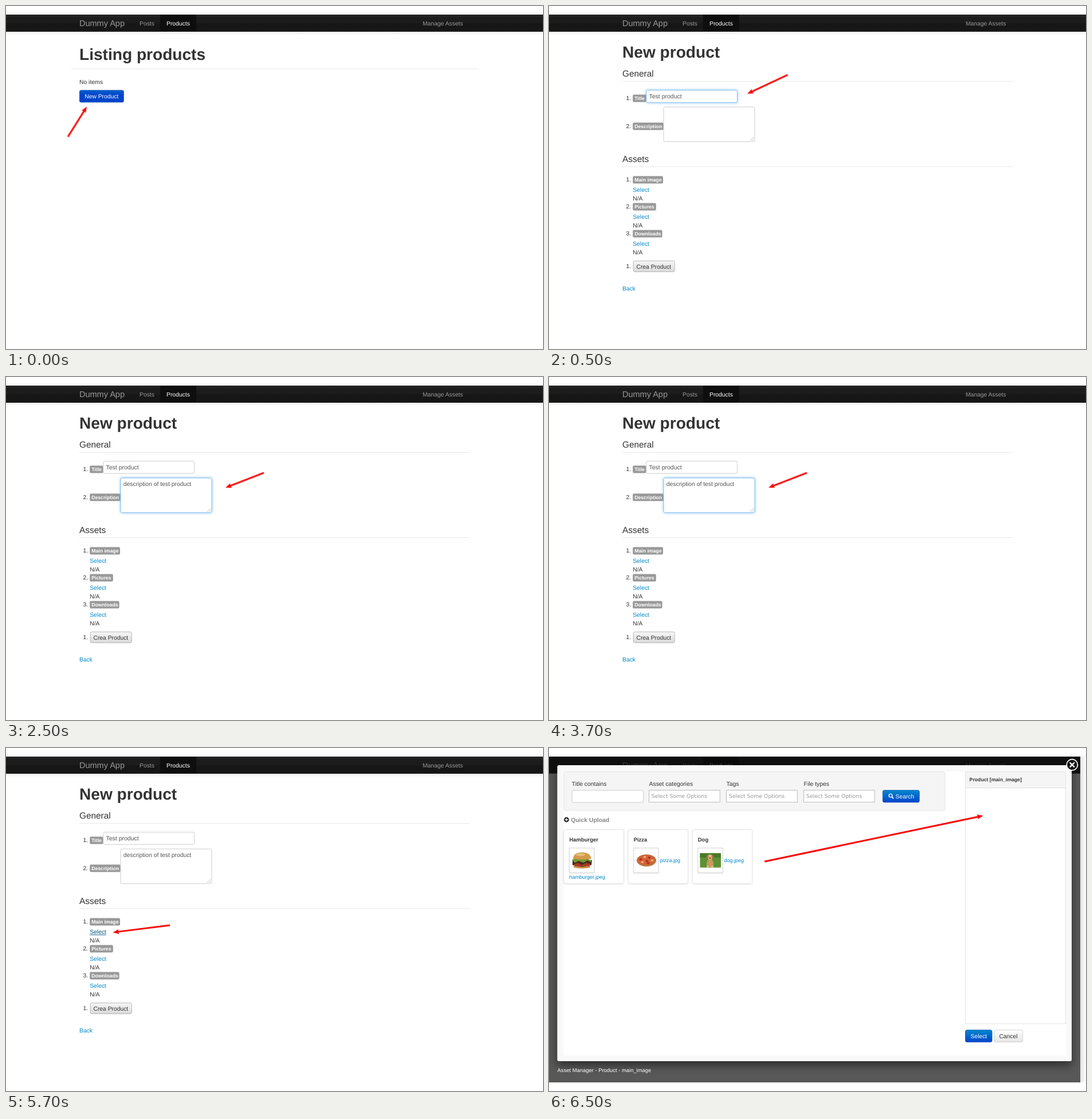
Animation, 937 px wide and 598 px high, one loop 8000 ms. Source, as an HTML page:

```html
<!DOCTYPE html>
<html lang="en">
<head>
<meta charset="utf-8">
<title>Product assets</title>
<style>
html, body { margin: 0; width: 100%; height: 100%; overflow: hidden; background: #fff; }
svg { display: block; }
text { font-family: "Liberation Sans", Arial, sans-serif; text-rendering: geometricPrecision; white-space: pre; }
.dv { font-family: "DejaVu Sans", sans-serif; }
</style>
</head>
<body>
<svg id="stage" width="937" height="598" viewBox="0 0 937 598" xmlns="http://www.w3.org/2000/svg">
  <defs>
    <linearGradient id="nav" x2="0" y2="1"><stop stop-color="#222"/><stop offset="1" stop-color="#111"/></linearGradient>
    <linearGradient id="blue" x2="0" y2="1"><stop stop-color="#08c"/><stop offset="1" stop-color="#04c"/></linearGradient>
    <linearGradient id="deep" x2="0" y2="1"><stop stop-color="#0060cc"/><stop offset=".4" stop-color="#04c"/><stop offset="1" stop-color="#04c"/></linearGradient>
    <linearGradient id="pale" x2="0" y2="1"><stop stop-color="#fff"/><stop offset="1" stop-color="#e6e6e6"/></linearGradient>
    <linearGradient id="grey" x2="0" y2="1"><stop stop-color="#f6f6f6"/><stop offset="1" stop-color="#dadada"/></linearGradient>
    <linearGradient id="edge"><stop stop-color="#e4e4e4"/><stop offset="1" stop-color="#fdfdfd"/></linearGradient>
    <filter id="glow" x="-20%" y="-50%" width="140%" height="200%"><feDropShadow dx="0" dy="0" stdDeviation="2.6" flood-color="#52a8ec" flood-opacity=".65"/></filter>
    <filter id="drop" x="-10%" y="-10%" width="120%" height="125%"><feDropShadow dx="0" dy="7" stdDeviation="8" flood-opacity=".5"/></filter>
    <filter id="soft" x="-10%" y="-50%" width="120%" height="220%"><feDropShadow dx="0" dy="1" stdDeviation="3" flood-opacity=".12"/></filter>
    <filter id="faint" x="-10%" y="-10%" width="120%" height="125%"><feDropShadow dx="0" dy=".8" stdDeviation=".9" flood-opacity=".12"/></filter>
    <clipPath id="lawn"><rect x="263.5" y="183.5" width="36.5" height="25"/></clipPath>
  </defs>
</svg>
<script>
const LOOP = 8000, BODY = 10.35, LINK = '#08c';
const stage = document.getElementById('stage');

// y is the middle of the capitals
const text = (s, x, y, size = BODY, fill = '#333', more = '') =>
  `<text x="${x}" y="${y + size * .36}" font-size="${size}" fill="${fill}" ${more}>${s}</text>`;
const bold = (s, x, y, size, fill) => text(s, x, y, size, fill, 'font-weight="700"');
const box = (x, y, w, h, fill, stroke = 'none', r = 0, more = '') =>
  `<rect x="${x}" y="${y}" width="${w}" height="${h}" rx="${r}" fill="${fill}" stroke="${stroke}" ${more}/>`;
const path = (d, fill, more = '') => `<path d="${d}" fill="${fill}" ${more}/>`;
const oval = (x, y, rx, ry, fill, more = '') =>
  `<ellipse cx="${x}" cy="${y}" rx="${rx}" ry="${ry}" fill="${fill}" ${more}/>`;
const rule = (x, y, w) => box(x, y, w, 1, '#e8e8e8');
const field = (x, y, w, h, focus) => focus
  ? box(x, y, w, h, '#fff', '#7fbdee', 2.5, 'filter="url(#glow)"')
  : box(x, y, w, h, '#fff', '#ccc', 2.5);
const tag = (s, x, y, w) => box(x, y - 6.3, w, 13, '#999', 'none', 2.2) + bold(s, x + 3, y + .2, 8.7, '#fff');

function button(s, x, y, w, h, tx, kind = 'blue') {
  const plain = kind === 'pale' || kind === 'grey';
  const line = kind === 'grey' ? '#aaa' : plain ? '#c8c8c8' : '#0549b8';
  return box(x + .4, y + .4, w - .8, h - .8, `url(#${kind})`, line, 2.6, 'stroke-width=".8"') +
    text(s, tx, y + h / 2 + .1, 10.3, plain ? '#333' : '#fff');
}

function arrow(x1, y1, x2, y2, width = 2.8) {
  const len = Math.hypot(x2 - x1, y2 - y1);
  const turn = Math.atan2(y2 - y1, x2 - x1) * 180 / Math.PI;
  return `<g transform="translate(${x2} ${y2}) rotate(${turn})">` +
    path(`M${-len} 0H-7`, 'none', `stroke="#f80808" stroke-width="${width}"`) +
    path('M0 0L-10.5 -4.3L-9 0L-10.5 4.3Z', '#f80808') + '</g>';
}

const navText = (dim, plain) =>
  text('Dummy App', 128, 30, 14.5, dim) + text('Posts', 233, 30, BODY, dim) +
  text('Products', 280, 30, BODY, plain) + text('Manage Assets', 727, 30, 10.3, dim);

const navbar = () =>
  box(-10, 15, 957, 29.5, 'url(#nav)', 'none', 0, 'filter="url(#soft)"') +
  box(0, 44, 937, .8, '#252525') +
  box(269, 15, 63, 29, '#0e0e0e') + navText('#999', '#fff');

const listing = () =>
  bold('Listing products', 128, 84, 28.1) + rule(114, 109.2, 710) +
  text('No items', 128, 132) +
  button('New Product', 128, 146.5, 77.7, 21.7, 137.3, 'deep') +
  arrow(108, 228, 141, 175.5);

const form = () => {
  let s = bold('New product', 128, 80.3, 28.1) +
    text('General', 128, 117.5, 15.35) + rule(128, 131, 681) +
    text('Assets', 128, 266, 15.4) + rule(128, 279.5, 681) +
    text('1.', 134.6, 160.5) + tag('Title', 146.2, 160.8, 23.5) +
    text('2.', 134.6, 209) + tag('Description', 146.2, 209.6, 53.6);
  [['Main image', 52.8], ['Pictures', 40.6], ['Downloads', 51.4]].forEach(([name, w], i) => {
    const y = 302.6 + 47 * i;
    s += text(i + 1 + '.', 134.6, y - .4) + tag(name, 146.2, y + .2, w) + text('N/A', 146.2, y + 32.2);
    if (i) s += text('Select', 146.2, y + 18, BODY, LINK);
  });
  return s + text('1.', 134.6, 453.2) +
    button('Crea Product', 146.7, 444, 73, 19.8, 152.5, 'grey') +
    text('Back', 128, 492.7, BODY, LINK);
};

const titleField = focus => field(169.8, 146.8, 158.7, 21.4, focus) +
  text('Test product', 174.5, 157.5, 10.5, '#555');
const noteField = (focus, s) => field(200, 176, 159, 60.4, focus) +
  text(s, 204.8, 186.5, BODY, '#555') +
  path('M351 235L357.5 228.5M354.5 235L357.5 232', 'none', 'stroke="#aaa" stroke-width=".7"');
const pick = hover => text('Select', 146.2, 320.6, BODY, hover ? '#005580' : LINK) +
  (hover ? box(146.2, 325.4, 28.5, .9, '#005580') : '');

const burger = () =>
  oval(57.5, 207, 15, 3, '#c98c45') +
  path('M41 196Q57 190 75 196L74 204Q57 210 41 204Z', '#4b2a18') +
  path('M40 195Q46 191 57 193T75 195L73 199L67 196L60 200L52 197L45 200Z', '#6f9a35') +
  path('M43 203L50 200L57 204L65 200L73 203L70 206H45Z', '#a83a22') +
  path('M42 193Q43 182 57.5 182T74 193Q58 196 42 193Z', '#d29a4c') +
  oval(55, 186, 8, 2.5, '#e6bd78');

const pizza = () => oval(170, 196, 17, 10.5, '#b8743a') + oval(169.5, 195, 15, 8.6, '#d4603a') +
  [[160, 194], [167, 190], [175, 191], [180, 196], [171, 197], [163, 199], [173, 201]]
    .map(([x, y], i) => oval(x, y, 2.6, 1.7, i % 2 ? '#e8b26c' : '#a9301f')).join('');

const dog = () => `<g clip-path="url(#lawn)">` + box(263, 183, 38, 26, '#5c9134') +
  box(263, 183, 38, 8, '#47792a') + oval(281, 202, 6, 8, '#c79a5e') +
  oval(281, 190.5, 4.8, 5, '#d9b27a') + oval(276.5, 191, 1.7, 3.7, '#a87840') +
  oval(285.5, 191, 1.7, 3.7, '#a87840') + oval(281, 192, 1.2, .9, '#3b281b') +
  oval(277, 207, 2.3, 2, '#dfbd8a') + oval(285, 207, 2.3, 2, '#dfbd8a') + '</g>';

function card(x, title, file, fx, fy, art) {
  return box(x, 142.3, 104.5, 94, '#fff', '#ddd', 3, 'stroke-width=".8" filter="url(#faint)"') +
    bold(title, x + 9.7, 159.5, 9.45) +
    box(x + 9.9, 174.3, 43, 43, '#fff', '#ccc', 0, 'stroke-width=".8" filter="url(#faint)"') +
    art() + text(file, fx, fy, 9, LINK);
}

const modal = () => {
  let s = box(0, 15, 937, 568, '#fff') + box(0, 15, 927, 568, '#585858') +
    box(0, 15, 927, 29.5, '#101010') + box(269, 15, 63, 29, '#0a0a0a') + navText('#383838', '#505050') +
    box(927, 15, 10, 568, 'url(#edge)') +
    box(14.5, 30, 897.5, 516, '#f9f9f9', 'none', 3, 'filter="url(#drop)"') +
    box(25.5, 41, 876.5, 495, '#fff') +
    box(26, 41.4, 665, 67.6, '#f5f5f5', '#e3e3e3', 3, 'stroke-width=".9"') +
    text('Title contains', 39.8, 62.5) + field(40.2, 73.8, 124.6, 21);
  ['Asset categories', 'Tags', 'File types'].forEach((name, i) => {
    const x = 174.6 + 135 * i;
    s += text(name, x, 62.5) + box(x, 73.7, 123.6, 20.6, '#fff', '#aaa', 0, 'stroke-width=".8"') +
      text('Select Some Options', x + 4.2, 84, 9.35, '#999', 'class="dv"');
  });
  s += button('Search', 582, 73.3, 64.6, 21.8, 604.6) +
    `<circle cx="596" cy="83" r="2.9" fill="none" stroke="#fff" stroke-width="1.4"/>` +
    path('M598 85L601 88', 'none', 'stroke="#fff" stroke-width="1.8"') +
    oval(30.5, 125, 4.4, 4.4, '#222') +
    path('M28 125H33M30.5 122.5V127.5', 'none', 'stroke="#fff" stroke-width="1.4"') +
    bold('Quick Upload', 38.2, 125, 10.4, '#888') +
    card(25.8, 'Hamburger', 'hamburger.jpeg', 35.4, 225, burger) +
    card(138, 'Pizza', 'pizza.jpg', 193.5, 195.5, pizza) +
    card(250.1, 'Dog', 'dog.jpeg', 305.6, 195.5, dog) +
    box(726.5, 41.4, 175, 439.4, '#fff', '#ddd', 0, 'stroke-width=".8"') +
    box(726.9, 41.8, 174.2, 27.6, '#f5f5f5') + box(726.5, 69.2, 175, .9, '#ddd') +
    bold('Product [main_image]', 733.6, 55.2, 8.7) +
    button('Select', 726.2, 491.3, 47.2, 21.8, 735.6) +
    button('Cancel', 776.6, 491.3, 50.4, 21.8, 785.4, 'pale') +
    text('Asset Manager - Product - main_image', 14.6, 561.5, 9.42, '#fff') +
    `<circle cx="912.8" cy="29.3" r="9.6" fill="#151515" stroke="#fff" stroke-width="1.7"/>` +
    path('M909.5 26L916.1 32.6M916.1 26L909.5 32.6', 'none', 'stroke="#fff" stroke-width="2.4" stroke-linecap="round"');
  return s + arrow(376, 198, 757.5, 118, 3);
};

// start, end, drawing
const steps = [
  [0, 8000, navbar()],
  [0, 500, listing()],
  [500, 6500, form()],
  [500, 2500, noteField(false, '') + titleField(true) + pick(false) + arrow(416.5, 120, 346, 153)],
  [2500, 4500, titleField(false) + noteField(true, 'description of test product') + pick(false) + arrow(450, 167, 383, 193)],
  [4500, 6500, titleField(false) + noteField(false, 'description of test product') + pick(true) + arrow(286, 309, 186.5, 321.5)],
  [6500, 8000, modal()]
];

for (const [from, to, art] of steps) {
  const g = document.createElementNS('http://www.w3.org/2000/svg', 'g');
  g.innerHTML = art;
  stage.append(g);
  if (to - from === LOOP) continue;
  const key = (time, opacity) => ({ offset: time / LOOP, opacity, easing: 'step-end' });
  const frames = from ? [key(0, 0), key(from, 1)] : [key(0, 1)];
  frames.push(to < LOOP ? key(to, 0) : key(LOOP, 1));
  if (to < LOOP) frames.push(key(LOOP, 0));
  g.animate(frames, { duration: LOOP, iterations: Infinity });
}
</script>
</body>
</html>
```
